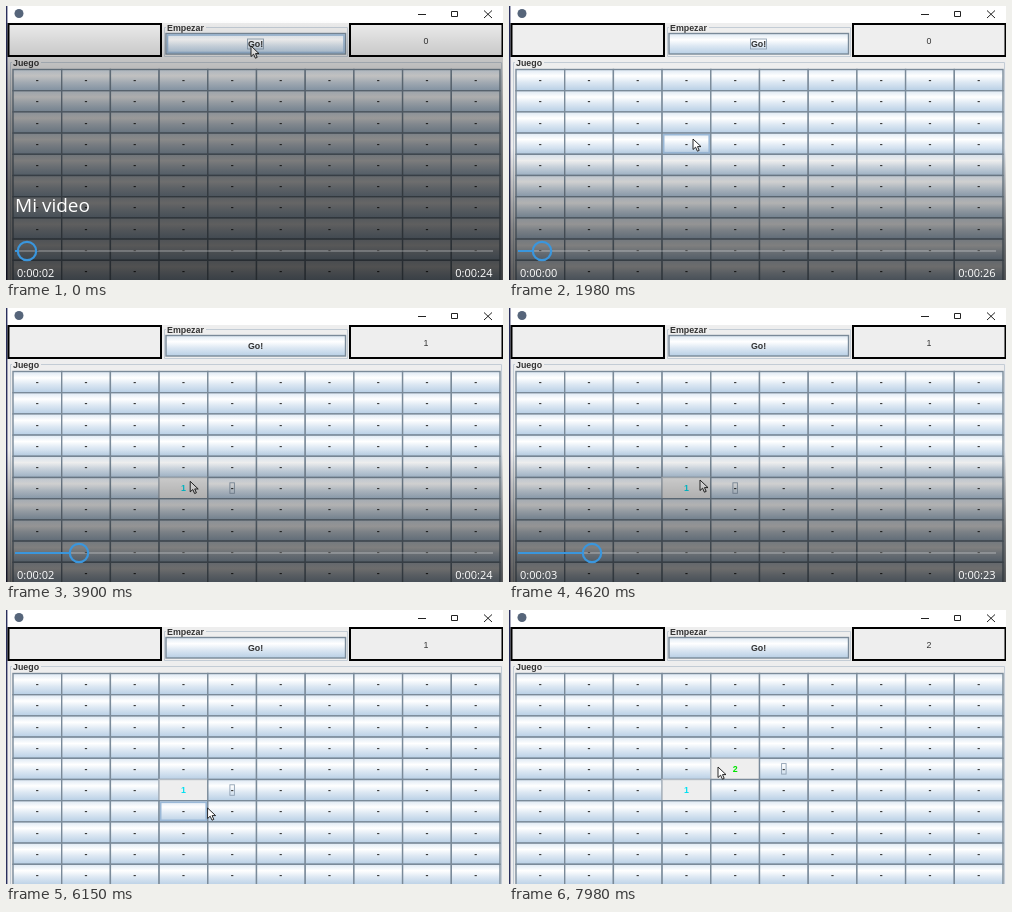
These frames come from a looping animation (497x274 px, 8000 ms). An HTML page:

```html
<!DOCTYPE html>
<html lang="es">
<head>
<meta charset="utf-8">
<style>
  html, body { margin: 0; width: 497px; height: 274px; overflow: hidden; background: #eee; }
  svg { display: block; }
  text { font: bold 8.85px "Liberation Sans", Arial, sans-serif; fill: #333; }
  .mid { text-anchor: middle; }
  .player text { font: 11px "Open Sans", "Noto Sans", sans-serif; fill: #fff; }
  .player .title { font-size: 19px; }
  .cell { stroke: #7a8a99; stroke-width: 1.4; }
  .glow { fill: none; stroke: #9bb9d8; stroke-width: 1.6; }
  .ring { fill: none; stroke: #8fa0b2; stroke-width: .9; }
  .frame { fill: #eee; stroke: #000; stroke-width: 2; }
  .etch { fill: none; stroke: #c3ccd5; }
</style>
</head>
<body>
<svg id="stage" width="497" height="274" viewBox="0 0 497 274">
  <defs>
    <linearGradient id="ocean" x2="0" y2="1">
      <stop offset="0" stop-color="#dde8f3"/><stop offset=".3" stop-color="#fff"/>
      <stop offset=".6" stop-color="#dde8f3"/><stop offset="1" stop-color="#b8cfe5"/>
    </linearGradient>
    <linearGradient id="fullShade" gradientUnits="userSpaceOnUse" x2="0" y1="14" y2="274">
      <stop offset="0" stop-opacity="0"/><stop offset=".19" stop-opacity=".22"/>
      <stop offset=".4" stop-opacity=".42"/><stop offset=".64" stop-opacity=".58"/>
      <stop offset="1" stop-opacity=".7"/>
    </linearGradient>
    <linearGradient id="lowShade" gradientUnits="userSpaceOnUse" x2="0" y1="142" y2="274">
      <stop offset="0" stop-opacity="0"/><stop offset=".62" stop-opacity=".45"/>
      <stop offset="1" stop-opacity=".62"/>
    </linearGradient>
  </defs>

  <rect width="497" height="274" fill="#eee"/>
  <rect width="497" height="17" fill="#fff"/>
  <circle cx="13" cy="7.5" r="4.5" fill="#56657a"/>
  <path d="M412 8.5h8M445.5 5.5h6v5h-6zM478 4.5l8 7.5M486 4.5l-8 7.5" fill="none" stroke="#222"/>
  <path d="M.7 0V274" stroke="#2a2f5c" stroke-width="1.4"/>

  <rect class="frame" x="2.5" y="18" width="152.5" height="32"/>
  <rect class="frame" x="344" y="18" width="152.5" height="32"/>
  <path class="etch" d="M200 21.5H341.5V50.5H158.5V21.5H160M35 56.5H495.5V274M6 56.5H4.5V274"/>
  <text x="161" y="25">Empezar</text>
  <text x="7" y="59.5">Juego</text>
  <rect class="cell" x="160" y="27.5" width="179.5" height="20.5" fill="url(#ocean)"/>
  <rect class="glow" id="goGlow" x="161.5" y="29" width="176.5" height="17.5"/>
  <text class="mid" x="249.5" y="41">Go!</text>
  <rect class="ring" id="goRing" x="241.5" y="33" width="16" height="10"/>
  <text class="mid" id="count" x="420" y="37.5" style="font-weight:400"></text>

  <g id="grid"></g>
  <rect class="glow" id="glow" width="45.5" height="18"/>
  <rect class="ring" id="ring" width="4.5" height="10.5"/>
  <path id="cursor" d="M0 0V10.5L2.6 8.2 4.4 12.2 6.2 11.4 4.5 7.6H8Z" fill="#fff" stroke="#111" stroke-width=".9"/>

  <g class="player" id="player">
    <rect id="shade" width="497" height="274"/>
    <path d="M9 245H487" stroke="#fff" stroke-opacity=".3" stroke-width="1.5"/>
    <path id="played" stroke="#3a96dd" stroke-width="2"/>
    <circle id="knob" cy="245" r="9.2" fill="none" stroke="#3a96dd" stroke-width="2.2"/>
    <text class="title" id="title" x="9" y="206">Mi video</text>
    <text id="elapsed" x="11" y="270.5"></text>
    <text id="left" x="486.5" y="270.5" text-anchor="end"></text>
  </g>
</svg>
<script>
const LOOP = 8000, COL = 48.7, ROW = 21.2, X0 = 7, Y0 = 63.5;
const $ = id => document.getElementById(id);
const set = (el, attrs) => { for (const k in attrs) el.setAttribute(k, attrs[k]); };
const show = (el, on) => set(el, { visibility: on ? 'visible' : 'hidden' });
const cellX = c => X0 + COL * c, cellY = r => Y0 + ROW * r;

function add(tag, attrs) {
  const el = document.createElementNS('http://www.w3.org/2000/svg', tag);
  set(el, attrs);
  return $('grid').appendChild(el);
}

const cells = Array.from({ length: 100 }, (_, i) => {
  const x = cellX(i % 10), y = cellY(Math.floor(i / 10));
  const box = add('rect', { class: 'cell', x, y, width: COL, height: ROW });
  const label = add('text', { class: 'mid', x: x + COL / 2, y: y + ROW / 2 + 3 });
  return { box, label };
});

// Cells the player opens: index, press and release times, result
const moves = [
  { cell: 53, press: 2580, open: 2700, text: '1', color: '#00e0f0' },
  { cell: 44, press: 7440, open: 7590, text: '2', color: '#00e400' }
];

// Pointer: time, x, y
const path = [
  [0, 245, 40], [1170, 245, 40], [1260, 243, 44], [1410, 243, 44], [1650, 215, 85],
  [1950, 184, 133], [2000, 184, 133], [2160, 181, 150], [2220, 181, 151], [2400, 178, 174],
  [3390, 178, 174], [3480, 181, 174], [3660, 181, 174], [4410, 191, 172], [5310, 191, 172],
  [5500, 170, 160], [5700, 140, 164], [5850, 135, 194], [6060, 187, 200], [6130, 201.6, 198],
  [6190, 201.6, 198], [6400, 215, 198], [6600, 222, 180], [6870, 209, 157], [6930, 208, 156],
  [7970, 208, 156], [7980, 209, 157], [LOOP, 209, 157]
];

const ramp = (t, a, b) => Math.min(1, Math.max(0, (t - a) / (b - a)));

function pointer(t) {
  const i = path.findIndex(p => p[0] > t);
  const [ta, xa, ya] = path[i - 1], [tb, xb, yb] = path[i];
  const k = ramp(t, ta, tb);
  return [xa + (xb - xa) * k, ya + (yb - ya) * k];
}

function drawGame(t) {
  const [x, y] = pointer(t);
  set($('cursor'), { transform: `translate(${x} ${y})` });

  for (const { box, label } of cells) {
    set(box, { fill: 'url(#ocean)', style: '' });
    label.textContent = '-';
    label.style.fill = '';
  }
  let focus = -1, opened = 0;
  for (const m of moves) {
    const { box, label } = cells[m.cell];
    if (t >= m.open) {
      set(box, { fill: '#eee', style: 'stroke:#b4bcc4' });
      label.textContent = m.text;
      label.style.fill = m.color;
      focus = m.cell + 1;
      opened++;
    } else if (t >= m.press) {
      set(box, { fill: '#b8cfe5' });
      focus = m.cell;
    }
  }
  $('count').textContent = opened;

  const c = Math.floor((x - X0) / COL), r = Math.floor((y - Y0) / ROW), at = r * 10 + c;
  const busy = moves.some(m => m.cell === at && t >= m.press);
  show($('glow'), r >= 0 && !busy);
  set($('glow'), { x: cellX(c) + 1.6, y: cellY(r) + 1.6 });
  show($('goGlow'), y < 48);

  show($('goRing'), focus < 0);
  show($('ring'), focus >= 0);
  set($('ring'), { x: cellX(focus % 10) + COL / 2 - 2.25, y: cellY(Math.floor(focus / 10)) + 5.3 });
}

function drawPlayer(t) {
  const intro = t < 1020;
  const knob = intro ? 21 : 53 + 5 * Math.floor((t - 2895) / 247);
  const sec = intro ? 2 : Math.max(0, Math.floor((t - 1120) / 1000));
  const clock = s => '0:00:' + String(s).padStart(2, '0');
  set($('player'), { opacity: intro ? 1 : ramp(t, 1560, 1860) - ramp(t, 4650, 5150) });
  set($('shade'), { fill: `url(#${intro ? 'fullShade' : 'lowShade'})` });
  set($('knob'), { cx: knob });
  set($('played'), { d: `M9 245H${Math.max(9, knob - 9)}` });
  show($('title'), intro);
  $('elapsed').textContent = clock(sec);
  $('left').textContent = clock(26 - sec);
}

const start = performance.now();
function tick() {
  const t = (performance.now() - start) % LOOP;
  drawGame(t);
  drawPlayer(t);
  requestAnimationFrame(tick);
}
tick();
</script>
</body>
</html>
```
